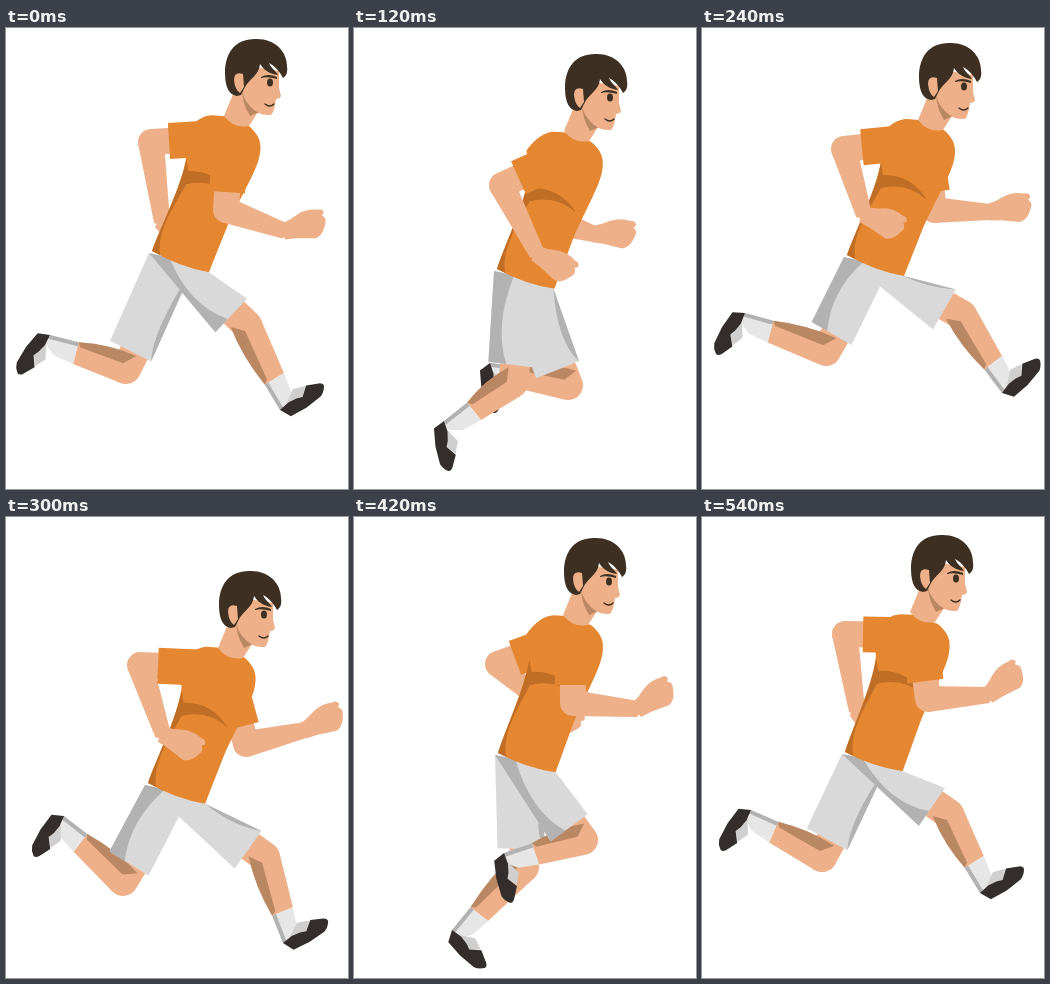
An HTML page with a canvas that plays this animation: 342 by 461 pixels, repeating every 0.57 s.

```html
<!DOCTYPE html>
<html lang="en">
<head>
<meta charset="utf-8">
<title>Runner</title>
<style>
  html, body { margin: 0; height: 100%; overflow: hidden; background: #fff; }
  canvas { display: block; }
</style>
</head>
<body>
<canvas id="stage" width="342" height="461"></canvas>
<script>
const ctx = document.getElementById('stage').getContext('2d');
const STEPS = 19, STEP_MS = 30;
const SKIN = '#eeb088', SKIN_SHADE = '#b98762', HAIR = '#3d3022', SHIRT = '#e58731',
  SHIRT_SHADE = '#c06d25', SHORTS = '#d9d9d9', SHORTS_SHADE = '#b2b2b2',
  SOCK = '#e6e6e6', TONGUE = '#cfcfcf', SHOE = '#332e2c';

// Key poses, each row starting with its step in the cycle.
// body: back of waist x y, head corner x y
const body = [
  [0, 146, 223, 219, 11], [2, 134, 284, 212, 77], [4, 143, 241, 211, 26],
  [6, 147, 217, 217, 5], [8, 145, 227, 217, 15], [10, 142, 266, 213, 54],
  [12, 132, 286, 211, 79], [14, 144, 236, 210, 21], [16, 144, 227, 209, 11],
  [18, 143, 235, 209, 18]];
// legs: knee x y, heel x y, foot angle
const nearLeg = [
  [0, 241, 297, 274, 382, -32], [2, 244, 362, 202, 440, 11], [4, 159, 355, 90, 393, 82],
  [6, 121, 324, 34, 322, 126], [8, 124, 323, 43, 285, 122], [10, 117, 364, 58, 299, 124],
  [12, 147, 378, 74, 341, 116], [14, 229, 323, 150, 336, 80], [16, 246, 308, 215, 388, 20],
  [18, 247, 297, 278, 376, -32]];
const farLeg = [
  [0, 120, 341, 44, 307, 127], [2, 148, 377, 74, 341, 116], [4, 214, 357, 136, 335, 82],
  [6, 250, 302, 218, 384, 18], [8, 260, 287, 300, 365, -44], [10, 259, 340, 277, 426, -29],
  [12, 244, 362, 202, 440, 11], [14, 170, 350, 98, 413, 46], [16, 122, 338, 38, 332, 122],
  [18, 120, 340, 49, 293, 124]];
// arms: elbow x y, wrist x y, fingers x y
const nearArm = [
  [0, 220, 182, 279, 203, 320, 187], [2, 212, 240, 260, 254, 297, 246],
  [4, 148, 157, 183, 226, 213, 238], [8, 142, 121, 162, 187, 201, 196],
  [10, 134, 148, 157, 218, 190, 228], [12, 155, 208, 197, 267, 235, 268],
  [14, 219, 186, 284, 192, 316, 163], [18, 226, 182, 287, 178, 316, 146]];
const farArm = [
  [0, 145, 114, 156, 194, 185, 215], [2, 155, 207, 197, 267, 235, 268],
  [4, 205, 195, 240, 206, 270, 202], [8, 232, 182, 288, 184, 322, 174],
  [10, 240, 227, 299, 213, 331, 192], [12, 212, 243, 262, 253, 297, 246],
  [14, 144, 147, 190, 188, 222, 203], [18, 143, 117, 155, 194, 183, 217]];

// Periodic Catmull-Rom through the key poses
function sample(track, step) {
  const n = track.length;
  const key = i => {
    const turn = Math.floor(i / n), row = track[i - turn * n];
    return { t: row[0] + turn * STEPS, v: row.slice(1) };
  };
  let i = n - 1;
  while (track[i][0] > step) i--;
  const [a, b, c, d] = [-1, 0, 1, 2].map(k => key(i + k));
  const span = c.t - b.t, u = (step - b.t) / span;
  return b.v.map((p, k) => {
    const q = c.v[k];
    const m0 = (q - a.v[k]) / (c.t - a.t) * span;
    const m1 = (d.v[k] - p) / (d.t - b.t) * span;
    return p + u * (m0 + u * (3 * (q - p) - 2 * m0 - m1 + u * (2 * (p - q) + m0 + m1)));
  });
}

const unit = (a, b) => {
  const x = b[0] - a[0], y = b[1] - a[1], length = Math.hypot(x, y) || 1;
  return [x / length, y / length, length];
};
const lerp = (a, b, u) => [a[0] + (b[0] - a[0]) * u, a[1] + (b[1] - a[1]) * u];
// Point in a limb's own axes: x along it, y towards its front
const at = (o, d, x, y) => [o[0] + d[0] * x + d[1] * y, o[1] + d[1] * x - d[0] * y];
const limbAxes = (o, d) => ctx.setTransform(d[0], d[1], d[1], -d[0], o[0], o[1]);
const stageAxes = () => ctx.setTransform(1, 0, 0, 1, 0, 0);

function fill(path, color) {
  ctx.fillStyle = color;
  ctx.fill(new Path2D(path));
}

function bar(a, b, width, color) {
  stageAxes();
  ctx.strokeStyle = color;
  ctx.lineWidth = width;
  ctx.lineCap = 'round';
  ctx.beginPath();
  ctx.moveTo(...a);
  ctx.lineTo(...b);
  ctx.stroke();
}

function drawLeg([kx, ky, hx, hy, angle], waist, waistFront, near) {
  const knee = [kx, ky], heel = [hx, hy], hip = lerp(waist, waistFront, 0.5);
  const thigh = unit(hip, knee), shin = unit(knee, heel), top = -shin[2];
  const turn = angle * Math.PI / 180;

  bar(lerp(hip, knee, 0.7), knee, 30, SKIN);
  limbAxes(heel, shin);
  fill(`M${top},-15Q${top * 0.7},-16 -29,-5L-33,17L${top},15Z`, SKIN);
  fill(`M${top - 4},-16L${top + 5},-4L-33,-1L-29,-5Q${top * 0.7},-16 ${top - 4},-16Z`, SKIN_SHADE);
  fill('M-29,-5L-33,17L-12,17L2,9L0,0Z', SOCK);
  fill('M-29,-5L-30,-1L0,4L0,0Z', SHORTS_SHADE);
  limbAxes(heel, [Math.cos(turn), Math.sin(turn)]);
  fill('M9,2L22,11L34,7L26,-1L16,-1Z', TONGUE);
  fill('M0,0L11,2L20,1L26,-1L35,7L47,2Q51,0 50,-3Q47,-8 42,-10L24,-12L6,-11Z', SHOE);

  stageAxes();
  const back = at(knee, thigh, -18, -27), front = at(knee, thigh, -18, 19);
  const corner = lerp(waist, waistFront, Math.min(1, Math.max(0.7, 0.87 + thigh[0] * 0.3)));
  const edge = [waist[0] - 3, waist[1] + 2];
  fill(`M${edge}L${back}L${front}L${corner}Z`, SHORTS);
  fill(near
    ? `M${edge}L${back}L${at(knee, thigh, -18, -9)}Q${at(knee, thigh, -55, -26)} ${lerp(waist, waistFront, 0.3)}Z`
    : `M${corner}L${front}Q${at(knee, thigh, -45, 6)} ${corner}Z`, SHORTS_SHADE);
}

function drawArm([ex, ey, wx, wy, fx, fy], shoulder) {
  const elbow = [ex, ey], wrist = [wx, wy];
  const upper = unit(shoulder, elbow), fore = unit(elbow, wrist);
  bar(lerp(shoulder, elbow, 0.6), elbow, 26, SKIN);
  limbAxes(wrist, fore);
  fill(`M${-fore[2]},-13L0,-8L4,0L0,8L${-fore[2]},13Z`, SKIN);
  limbAxes(wrist, unit(wrist, [fx, fy]));
  fill('M-3,8Q8,8 18,11Q28,13 38,8Q43,8 43,3L40,1Q44,-3 40,-8Q34,-18 26,-18L8,-11L-3,-8Z', SKIN);
  limbAxes(elbow, upper);
  fill(`M${-upper[2]},-18L-18,-18L-18,18L${-upper[2]},18Z`, SHIRT);
}

function drawTorso() {
  fill('M0,0C10,-28 30,-66 34,-95L32,-118Q46,-136 60,-136L72,-135L97,-125' +
    'C107,-116 110,-108 107,-95C104,-80 90,-58 76,-27L57,21Q28,16 0,0Z', SHIRT);
  fill('M0,0C10,-28 28,-62 34,-92L36,-80Q64,-81 80,-55Q60,-73 34,-67C20,-42 5,-20 8,4Z', SHIRT_SHADE);
}

function drawHead(x, y) {
  ctx.setTransform(1, 0, 0, 1, x, y);
  fill('M11,48L-1,77Q9,90 24,87L35,70Z', SKIN);
  fill('M17,50Q17,64 25,77L34,73Z', SKIN_SHADE);
  fill('M17,26L54,32L54,49L56,57Q55,60 51,60L50,66Q48,76 45,76Q33,77 24,66Q17,58 17,48Z', SKIN);
  fill('M0,34C0,14 10,0 30,0C49,-1 62,12 62,27C63,34 61,37 58,39C55,33 50,27 44,24' +
    'C46,29 51,32 53,36C44,35 38,30 35,25C34,37 24,39 19,50L16,56L12,57C4,56 0,48 0,34Z', HAIR);
  fill('M18,35Q9,32 9,41Q10,51 15,54L19,48Z', SKIN);
  fill('M36,38Q43,34 52,38L52,40Q43,37 36,39Z', HAIR);
  fill('M42,43.500A3,4 0 1 1 48,43.500A3,4 0 1 1 42,43.500Z', HAIR);
  ctx.strokeStyle = HAIR;
  ctx.lineWidth = 1.3;
  ctx.stroke(new Path2D('M40,65Q45,69 49,65'));
}

function draw(step) {
  stageAxes();
  ctx.fillStyle = '#fff';
  ctx.fillRect(0, 0, 342, 461);

  const [wx, wy, hx, hy] = sample(body, step);
  const lean = Math.atan2(hx - wx, wy - hy) - Math.atan2(72, 212);
  const cos = Math.cos(lean), sin = Math.sin(lean);
  const onTorso = (x, y) => [wx + x * cos - y * sin, wy + x * sin + y * cos];
  const waist = [wx, wy], waistFront = onTorso(57, 21), shoulder = onTorso(78, -114);

  drawArm(sample(farArm, step), shoulder);
  drawLeg(sample(farLeg, step), waist, waistFront, false);
  drawLeg(sample(nearLeg, step), waist, waistFront, true);
  ctx.setTransform(cos, sin, -sin, cos, wx, wy);
  drawTorso();
  drawArm(sample(nearArm, step), shoulder);
  drawHead(hx, hy);
}

const start = performance.now();
function tick() {
  draw(Math.floor((performance.now() - start) / STEP_MS) % STEPS);
  requestAnimationFrame(tick);
}
tick();
</script>
</body>
</html>
```
